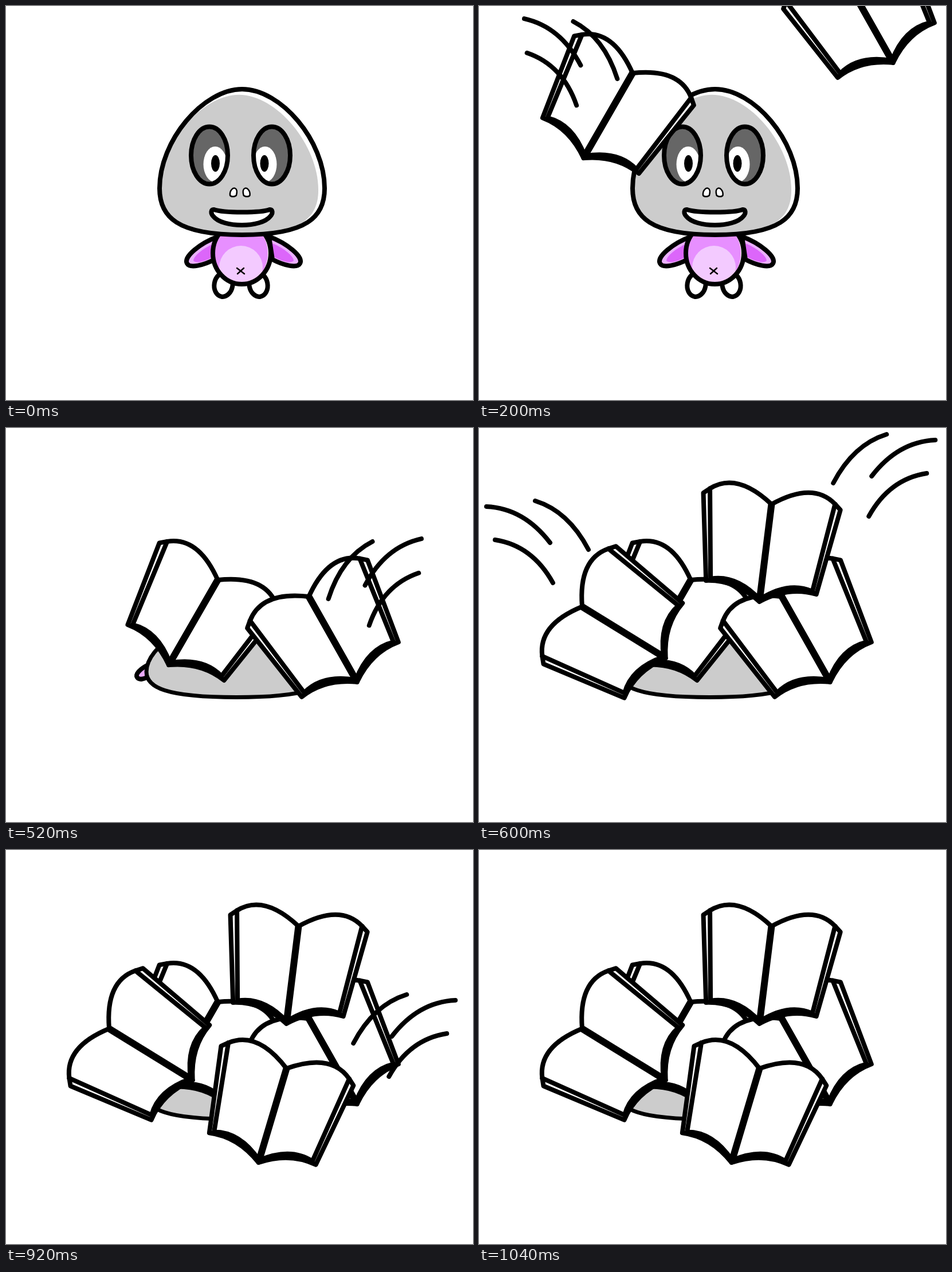
Recreate the animation shown at these times as an HTML page with a canvas. Size 815 by 687 pixels, loop 1.16 s.

```html
<!DOCTYPE html>
<html lang="en">
<head>
<meta charset="utf-8">
<title>Falling books</title>
<style>
html, body { margin: 0; width: 100%; height: 100%; overflow: hidden; background: #fff; }
canvas { display: block; }
</style>
</head>
<body>
<canvas id="stage" width="815" height="687"></canvas>
<script>
const ctx = document.getElementById('stage').getContext('2d');
const LOOP = 1160, STEP = 200, LAST = 5;
const HEAD = new Path2D(
  'M412,145 C480,145 556,235 556,318 C556,368 525,399 412,399 ' +
  'C299,399 268,368 268,318 C268,235 344,145 412,145 Z');
const MOUTH = new Path2D(
  'M363,355 C380,361 445,361 460,355 C466,354 466,362 461,367 ' +
  'C445,387 378,387 362,367 C357,362 357,354 363,355 Z');
const ARM = new Path2D('M370,402 C340,413 309,437 316,449 C321,458 345,452 364,442 Z');
const PALM = new Path2D('M366,413 C348,420 328,434 327,444 C333,450 348,445 366,435 Z');
const NOSTRIL = new Path2D('M391,330 C390,322 396,316 400,318 C404,320 403,326 402,330 C400,333 392,333 391,330 Z');
const SQUASHED_HAND = new Path2D('M250,412 C233,420 225,430 229,435 C233,440 240,438 250,433');

function ellipse(x, y, rx, ry, turn = 0) {
  const p = new Path2D();
  p.ellipse(x, y, rx, ry, turn, 0, Math.PI * 2);
  return p;
}

// Scales a path around a fixed point, then moves it.
function scaled(path, sx, sy, cx, cy, dx = 0, dy = 0) {
  const p = new Path2D();
  p.addPath(path, new DOMMatrix([sx, 0, 0, sy, cx * (1 - sx) + dx, cy * (1 - sy) + dy]));
  return p;
}

function fill(path, color) {
  ctx.fillStyle = color;
  ctx.fill(path);
}

function line(path, width = 8) {
  ctx.lineWidth = width;
  ctx.stroke(path);
}

function inside(path, draw) {
  ctx.save();
  ctx.clip(path);
  draw();
  ctx.restore();
}

function mirrored(axis, draw) {
  draw();
  ctx.save();
  ctx.translate(axis * 2, 0);
  ctx.scale(-1, 1);
  draw();
  ctx.restore();
}

function head(place, width) {
  const outline = place(HEAD);
  fill(outline, '#fff');
  inside(outline, () => fill(place(scaled(HEAD, 0.962, 0.962, 268, 399)), '#ccc'));
  line(outline, width);
}

function eye(x, irisX, pupilX) {
  const socket = ellipse(x, 260.5, 32, 50);
  fill(socket, '#666');
  inside(socket, () => fill(ellipse(irisX, 276, 20.5, 31), '#fff'));
  line(socket);
  fill(ellipse(pupilX, 274.5, 7.5, 14.5), '#000');
}

function creature() {
  mirrored(410, () => {
    const foot = ellipse(379.5, 486, 16, 21, 0.17);
    fill(foot, '#fff');
    line(foot);
  });
  mirrored(414.5, () => {
    fill(ARM, '#ebb0ff');
    fill(PALM, '#dc66fa');
    line(ARM);
  });

  const body = ellipse(411.5, 431, 50.5, 54);
  fill(body, '#fff');
  inside(body, () => {
    fill(ellipse(406, 431, 51, 56), '#e78fff');
    fill(ellipse(410, 456, 38, 38), '#f3caff');
  });
  line(body);
  line(new Path2D('M403,457 L416,467 M415,457 L404,467'), 2.5);

  head(p => p, 8);
  eye(355, 365, 365.5);
  eye(464, 452, 451);
  mirrored(408.3, () => {
    fill(NOSTRIL, '#fff');
    line(NOSTRIL, 2.5);
  });
  fill(MOUTH, '#fff');
  line(MOUTH);
}

function squashed() {
  fill(SQUASHED_HAND, '#ebaaff');
  line(SQUASHED_HAND);
  head(p => scaled(p, 1.09, 0.55, 412, 399, -10, 70.5), 7);
}

const PAGE = new Path2D(
  'M0,0 Q67,-49 110,-14 L120.5,-5 L97,146 Q47,138 0,171 Z');
const PAGE_LINES = new Path2D('M110,-14 L89.5,142 Q46,129 0,167');
const SPINE = new Path2D('M0,1 L0,168');

// (x, y) is the top of the spine.
function book(x, y, degrees) {
  ctx.save();
  ctx.translate(x, y);
  ctx.rotate(degrees * Math.PI / 180);
  mirrored(0, () => fill(PAGE, '#fff'));
  mirrored(0, () => {
    line(PAGE);
    line(PAGE_LINES);
  });
  line(SPINE, 12);
  ctx.restore();
}

const STREAKS = new Path2D(
  'M0,0 Q-58,18 -93,85 M85,10 Q20,13 -26,73 M70,68 Q5,78 -31,143');

function streaks(x, y, degrees = 0, flip = 1) {
  ctx.save();
  ctx.translate(x, y);
  ctx.scale(flip, 1);
  ctx.rotate(degrees * Math.PI / 180);
  line(STREAKS);
  ctx.restore();
}

function draw(step) {
  ctx.fillStyle = '#fff';
  ctx.fillRect(0, 0, 815, 687);
  ctx.strokeStyle = '#000';
  ctx.lineCap = ctx.lineJoin = 'round';

  if (step < 2) creature();
  else squashed();

  if (step === 1) {
    book(268, 117, 30);
    book(638.5, -50, -29.5);
    streaks(164.5, 27, -10, -1);
  }
  if (step >= 2) {
    book(369.5, 265, 30);
    book(528.5, 294, -29.5);
  }
  if (step === 2) streaks(639.5, 198, -10);
  if (step >= 3) {
    book(180, 311.5, -58.4);
    book(510.5, 133, 7.1);
  }
  if (step === 3) {
    streaks(98, 127, 0, -1);
    streaks(711.3, 11);
  }
  if (step >= 4) book(489.5, 381, 16.6);
  if (step === 4) streaks(699.3, 252);
}

let shown = -1;
const start = performance.now();

function tick() {
  const time = (performance.now() - start) % LOOP;
  const step = Math.min(LAST, Math.floor(time / STEP));
  if (step !== shown) draw(shown = step);
  requestAnimationFrame(tick);
}
tick();
</script>
</body>
</html>
```
